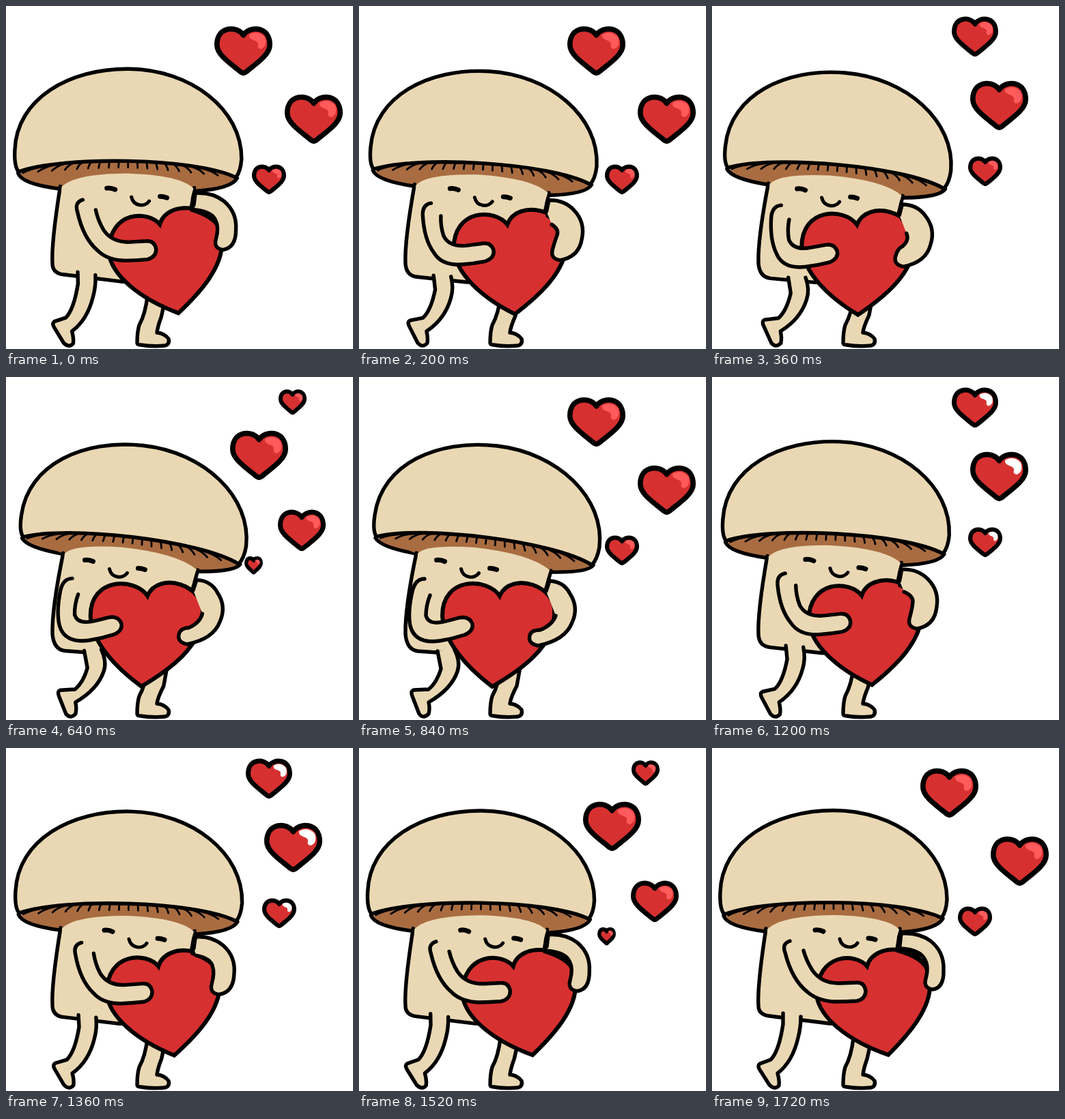
Recreate the animation shown at these times as an HTML page. Size 508 by 503 pixels, loop 1.76 s.

```html
<!DOCTYPE html>
<html lang="en">
<head>
<meta charset="utf-8">
<title>Mushroom with a heart</title>
<style>
  html, body { margin: 0; height: 100%; overflow: hidden; background: #fff; }
  svg { display: block; width: 100%; height: 100%; stroke-linecap: round; stroke-linejoin: round; }
</style>
</head>
<body>
<svg id="stage" viewBox="0 0 508 503"></svg>
<script>
const STEP = 40, STEPS = 44, LINE = 5.4;
const CREAM = '#ead8b4', RED = '#d73030', BROWN = '#a96c41', PINK = '#ff5a5c', INK = '#000';
const stage = document.getElementById('stage');

// Each limb or surface: its shape leaning right, then leaning left (same commands in both).
const shapes = {
  gills: ['M17 246Q22 262 78 269L278 270Q330 266 338 250',
          'M24 236Q32 250 84 259L281 286Q335 287 343 276'],
  body: ['M79 265Q66 350 68 378Q68 391 84 393L172 404L235 404Q268 340 275 265',
         'M84 258Q67 340 68 377Q70 400 86 402L142 406L225 404Q260 370 281 284'],
  bodyTop: ['M81 266Q100 246 178 245Q256 247 274 266L270 280L81 280Z',
            'M86 259Q98 245 170 250Q250 259 279 283L275 295L86 270Z'],
  backLeg: ['M207 425Q204 452 195 468Q192 478 192 494Q192 497 197 497Q215 500 233 498Q240 496 238 488Q232 480 221 479Q222 470 227 456L234 425',
            'M208 425Q204 452 195 468Q192 478 192 494Q192 497 197 497Q215 500 233 498Q240 496 238 488Q232 480 221 479Q222 470 231 453L236 425'],
  frontLeg: ['M104 389L104 405Q98 445 86 457L70 463Q66 466 70 472L84 494Q92 502 98 495Q99 488 96 477Q118 460 126 425Q130 410 130 394',
             'M115 402L120 428Q114 448 102 458L80 459Q75 461 78 468L88 494Q94 502 102 494Q104 486 102 477Q135 458 144 432Q149 418 140 400'],
  heart: ['M227 320C210 300 154 300 153 362C157 395 198 429 258 450C288 420 321 382 319 345C320 290 238 280 227 320Z',
          'M206 321C188 294 122 292 122 350C124 388 157 425 195 454C238 429 284 396 286 350C292 305 222 284 206 321Z'],
  shadow: ['M270 296Q303 292 314 325Q306 308 270 298Z',
           'M280 318Q293 335 288 350Q288 335 280 320Z'],
  backArm: ['M275 290L277 272Q302 270 320 283Q340 299 339 325Q340 352 323 354Q309 352 313 338Q318 320 311 309Q304 296 277 294',
            'M274 314L279 299Q300 300 309 318Q322 338 312 360Q302 386 262 394Q247 391 250 379Q252 371 265 371Q283 364 288 350Q292 336 283 318'],
  frontArm: ['M114 283Q102 287 107 300Q117 340 140 358Q155 371 180 372Q196 372 212 371Q225 368 225 356Q223 343 211 344L186 345Q160 345 147 326Q138 312 134 297',
             'M96 296Q82 296 78 315Q71 345 75 365Q82 392 118 387Q137 384 155 378Q168 372 166 362Q161 350 147 353L128 358Q102 365 98 350Q98 335 104 320']
};

// Floating hearts: left, top, width and height in each of three poses.
const floating = [
  [[305, 29, 85, 73], [408, 129, 85, 73], [360, 232, 50, 44]],
  [[351, 15, 68, 59], [378, 109, 85, 73], [375, 220, 50, 44]],
  [[399, 18, 41, 37], [328, 78, 85, 73], [398, 194, 70, 61], [349, 263, 27, 26]]
];

const path = (d, fill, width = 0, extra = '') =>
  `<path d="${d}" fill="${fill}" stroke="${width ? INK : 'none'}" stroke-width="${width}" ${extra}/>`;

function blend([from, to], q) {
  const ends = to.match(/[\d.]+/g);
  let i = 0;
  return from.replace(/[\d.]+/g, n => +n + (ends[i++] - n) * q);
}

const easeOut = u => 1 - (1 - Math.min(u, 1)) ** 2;

// 0 leans right, 1 leans left; each swing slows towards its end.
function leanAt(time) {
  const t = (time + STEP) % (STEP * STEPS);
  return t < 900 ? easeOut(t / 880) : 1 - easeOut((t - 900) / 880);
}

function gillLines() {
  let d = '';
  for (let i = 0; i <= 18; i++) {
    const k = i / 9 - 1, x = 178 + 122 * k, y = 228 + 9 * k * k + 1.5 * k;
    const dx = 28 * k ** 3 + 4 * k, dy = 8 + 2 * Math.abs(k);
    d += `M${x} ${y}q${dx * 0.6} ${dy * 0.3} ${dx} ${dy}`;
  }
  return path(d, 'none', 2.8);
}

const dome = path('M18 244Q11 236 12 212C14 137 90 91.5 178 91.5C268 91.5 344 149 344 222Q343 240 336 249C275 220 80 220 18 244Z', CREAM, LINE);
const underside = path('M18 244C80 220 275 220 336 249L276 264L80 262Z', BROWN) + gillLines();

const face =
  path('M151 267Q157 266 163 269M229 279Q234 279 239 281', 'none', 7) +
  path('M187 280C190 294 207 295 213 286', 'none', 5);

function mushroom(q) {
  const part = (name, fill, width, extra) => path(blend(shapes[name], q), fill, width, extra);
  const cap = `<g transform="translate(${6 * q} ${8.5 * q}) rotate(${6.6 * q} 178 248)">`;
  return part('gills', BROWN, LINE) + cap + underside + '</g>' +
    part('body', CREAM, LINE) + part('bodyTop', CREAM) +
    part('backLeg', CREAM, LINE) + part('frontLeg', CREAM, LINE) +
    cap + dome + '</g>' +
    `<g transform="translate(${-37.5 * q} ${1.5 * q})">${face}</g>` +
    part('heart', RED, 6, 'stroke-linejoin="miter"') + part('shadow', INK, 3) +
    part('backArm', CREAM, LINE) + part('frontArm', CREAM, LINE);
}

function smallHeart([x, y, w, h], shine) {
  const line = 4.2 + w * 0.04, sx = (w - line) / 77, sy = (h - line) / 65;
  return `<g transform="translate(${x + line / 2} ${y + line / 2}) scale(${sx} ${sy})">` +
    path('M38.5 10C30 -4 0 -4 0 24C0 38 18 50 34 63Q38.5 67 43 63C59 50 77 38 77 24C77 -4 47 -4 38.5 10Z', RED, line / sx) +
    path('M47 9Q60 2 70 13Q74 26 64 30Q58 29 60 23Q60 19 53 17Q46 15 47 9Z', shine) + '</g>';
}

function render(now) {
  const step = Math.floor(now / STEP) % STEPS;
  const phase = (step + 1) % 22;
  const pose = phase < 7 ? 0 : phase < 15 ? 1 : 2;
  const shine = pose === 1 && step > 22 ? '#fff' : PINK;
  stage.innerHTML = mushroom(leanAt(step * STEP)) +
    floating[pose].map(box => smallHeart(box, shine)).join('');
}

const start = performance.now();
function tick() {
  render(performance.now() - start);
  requestAnimationFrame(tick);
}
tick();
</script>
</body>
</html>
```
